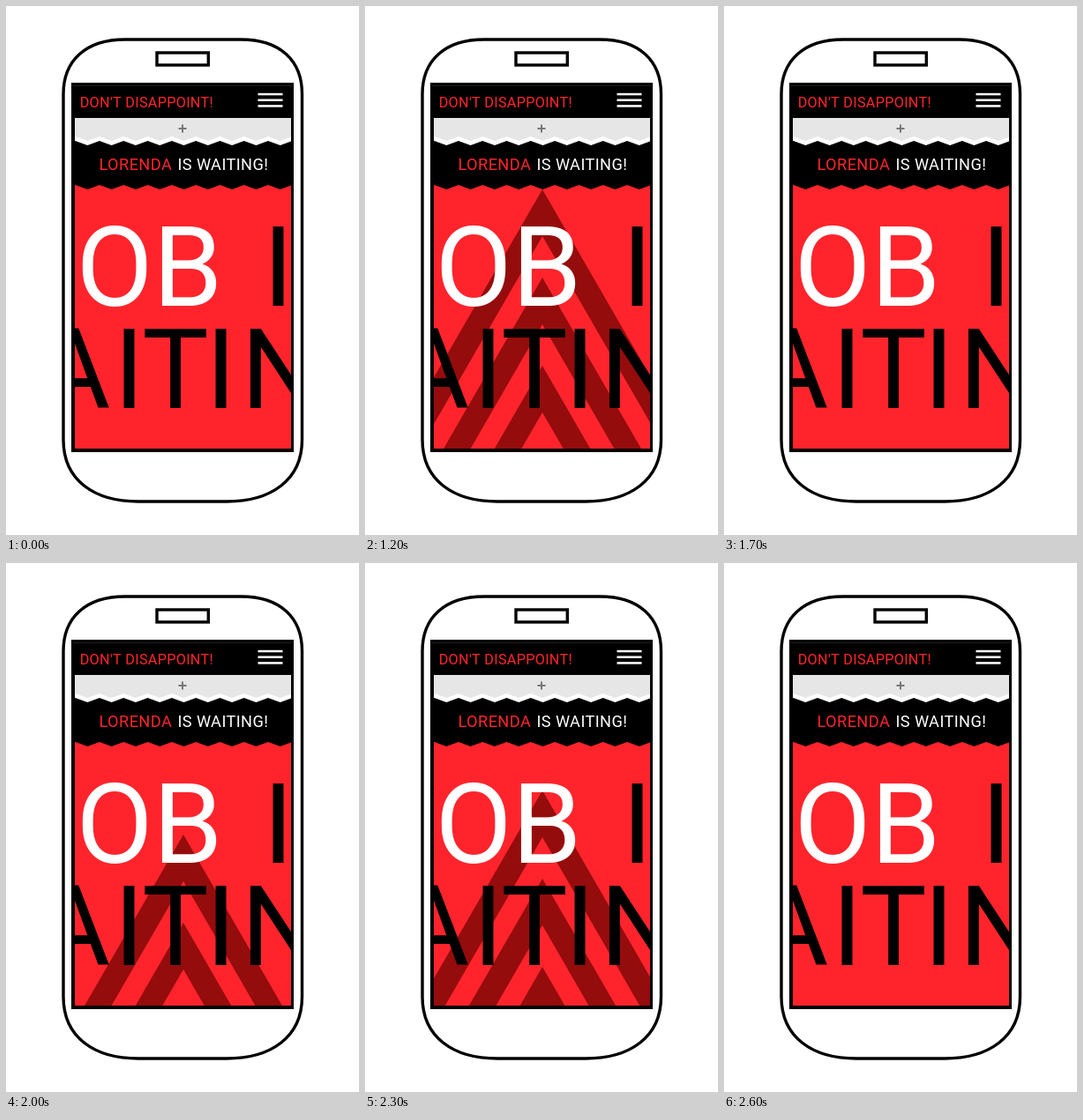
An HTML page with a canvas for the animation above (2.7 s loop, 400 px wide and 600 px high).

```html
<!DOCTYPE html>
<html lang="en">
<head>
<meta charset="utf-8">
<title>Don't disappoint</title>
<style>
  html, body { margin: 0; width: 100%; height: 100%; overflow: hidden; background: #fff; }
  canvas { display: block; width: 400px; height: 600px; }
</style>
</head>
<body>
<canvas id="stage" width="400" height="600"></canvas>
<script>
const ctx = document.getElementById('stage').getContext('2d');
const RED = '#ff242c', DARK = '#950c0c';
const LOOP = 2700;
const LEFT = 78, RIGHT = 323, TOP = 127, BOTTOM = 502;

// [start time, apex height of the top chevron]; 0 hides them
const STEPS = [
  [0, 0],
  [1000, 358], [1100, 308], [1200, 208],
  [1400, 258], [1500, 308], [1600, 358], [1700, 0],
  [1900, 358], [2000, 308], [2100, 208],
  [2300, 258], [2400, 308], [2500, 358], [2600, 0]
];

function box(x, y, w, h, color) {
  ctx.fillStyle = color;
  ctx.fillRect(x, y, w, h);
}

function text(str, x, y, size, color, spacing = 0, align = 'left') {
  ctx.font = `400 ${size}px Roboto, "Open Sans", sans-serif`;
  ctx.letterSpacing = spacing + 'px';
  ctx.textAlign = align;
  ctx.fillStyle = color;
  ctx.fillText(str, x, y);
}

// Band from y0 down to a toothed lower edge
function toothed(y0, edge, color) {
  const half = 13.65;
  ctx.beginPath();
  ctx.moveTo(LEFT - 20, y0);
  for (let k = -11; k <= 11; k++) {
    ctx.lineTo(201.5 + k * half, edge + (k % 2 ? 0 : 5));
  }
  ctx.lineTo(RIGHT + 40, y0);
  ctx.closePath();
  ctx.fillStyle = color;
  ctx.fill();
}

function chevrons(apex) {
  const cx = 201, slope = 0.577, thick = 53, drop = 320;
  ctx.fillStyle = DARK;
  for (let y = apex; y < BOTTOM; y += 100) {
    ctx.beginPath();
    ctx.moveTo(cx, y);
    ctx.lineTo(cx + drop * slope, y + drop);
    ctx.lineTo(cx + drop * slope, y + drop + thick);
    ctx.lineTo(cx, y + thick);
    ctx.lineTo(cx - drop * slope, y + drop + thick);
    ctx.lineTo(cx - drop * slope, y + drop);
    ctx.fill();
  }
}

function phone() {
  ctx.beginPath();
  ctx.moveTo(65, 100);
  ctx.bezierCurveTo(65, 62, 90, 38, 135, 38);
  ctx.lineTo(266, 38);
  ctx.bezierCurveTo(311, 38, 335.5, 62, 335.5, 100);
  ctx.lineTo(335.5, 492);
  ctx.bezierCurveTo(335.5, 538, 300, 562, 250, 562);
  ctx.lineTo(150, 562);
  ctx.bezierCurveTo(100, 562, 65, 538, 65, 492);
  ctx.closePath();
  ctx.strokeStyle = '#000';
  ctx.lineWidth = 3.4;
  ctx.stroke();
  ctx.strokeRect(171, 53, 58.3, 14);
  box(74, 87, 252, 419, '#000');
}

function bigLetters(str, y, color, centers) {
  [...str].forEach((c, i) => text(c, centers[i], y, 126.5, color, 0, 'center'));
}

function content(apex) {
  ctx.save();
  ctx.beginPath();
  ctx.rect(LEFT, TOP, RIGHT - LEFT, BOTTOM - TOP);
  ctx.clip();
  box(LEFT, TOP, RIGHT - LEFT, BOTTOM - TOP, RED);
  if (apex) chevrons(apex);
  bigLetters('OB', 340, '#fff', [123, 206]);
  bigLetters('I', 340, '#000', [308.5]);
  bigLetters('AITIN', 456, '#000', [77, 139.5, 192, 243.5, 311.5]);
  toothed(TOP, 203, '#000');
  toothed(TOP, 153, '#fff');
  toothed(TOP, 148, '#e6e6e6');
  ctx.restore();
}

function header() {
  box(76, 90, 248, 1, '#1b201b');
  text("DON'T DISAPPOINT!", 83.7, 115, 16.2, RED, 0.3);
  for (let i = 0; i < 3; i++) box(285.5, 98.8 + i * 6.7, 28, 2.5, '#fff');
  box(195.5, 138, 9, 2, '#777');
  box(199, 134.5, 2, 9, '#777');
  text('LORENDA', 105.5, 186, 18.2, RED, 0.4);
  text('IS WAITING!', 194.5, 186, 18.2, '#fff', 0.4);
}

function draw(now) {
  const t = now % LOOP;
  const apex = STEPS.filter(s => s[0] <= t).pop()[1];
  box(0, 0, 400, 600, '#fff');
  phone();
  content(apex);
  header();
}

function tick() {
  draw(performance.now());
  requestAnimationFrame(tick);
}
tick();
</script>
</body>
</html>
```
